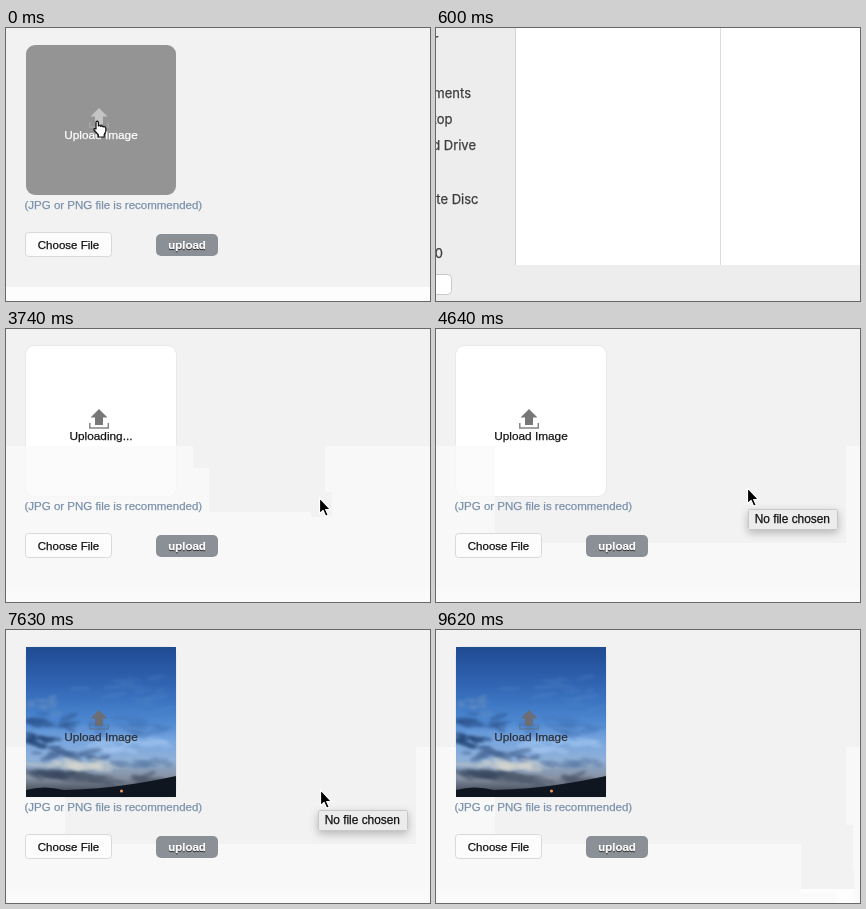
Animation, 424 px wide and 273 px high, one loop 9720 ms. Source, as an HTML page with a canvas:

```html
<!DOCTYPE html>
<html lang="en">
<head>
<meta charset="utf-8">
<title>Image upload</title>
<style>
  html, body { margin: 0; width: 100%; height: 100%; overflow: hidden; background: #f2f2f2; }
  canvas { display: block; }
</style>
</head>
<body>
<canvas id="stage" width="424" height="273"></canvas>
<script>
const W = 424, H = 273, LOOP = 9720;
const SANS = '"Liberation Sans", Arial, sans-serif';
const UI = 'Inter, Roboto, sans-serif';
const stage = document.getElementById('stage').getContext('2d');

// Held poses: [start time, x, y]; a pose without a position hides the pointer.
const pointerPoses = [
  [0], [3140, 189, 0], [3290, 205, 119], [3590, 307, 162], [3740, 313, 168],
  [3890, 312, 161], [4040, 311, 159], [4490, 310, 159], [4640, 311, 158],
  [7630, 314, 159], [7780, 316, 161], [7930, 320, 165], [8080, 328, 170],
  [8200, 342, 180], [8350, 366, 196], [8500, 405, 242], [8650, 405, 262], [8800]
];
// Vertical offset of the file dialog: [start time, offset].
const dialogPoses = [[0], [300, -171], [450, -28], [600, 0], [2400, -171], [2550]];
// Areas where the page is repainted without the haze: [time, x, y, width, height].
const refreshed = [
  [2550, 0, 0, 424, 117], [3290, 187, 0, 30, 139], [3590, 203, 117, 116, 66],
  [3740, 305, 163, 21, 25], [4040, 59, 102, 351, 112],
  [8500, 365, 195, 52, 68], [8650, 400, 239, 18, 34]
];

const poseAt = (poses, t) => poses.findLast(pose => pose[0] <= t).slice(1);

function rect(c, x, y, w, h, fill) {
  c.fillStyle = fill;
  c.fillRect(x, y, w, h);
}

function roundRect(c, x, y, w, h, radius, fill, stroke) {
  c.beginPath();
  c.roundRect(x, y, w, h, radius);
  c.fillStyle = fill;
  c.fill();
  if (stroke) {
    c.strokeStyle = stroke;
    c.lineWidth = 1;
    c.stroke();
  }
}

// The hairline outline gives the slightly heavier strokes of smoothed type.
function text(c, label, x, y, font, fill, align = 'left') {
  c.font = font;
  c.fillStyle = c.strokeStyle = fill;
  c.textAlign = align;
  c.lineWidth = .25;
  c.fillText(label, x, y);
  c.strokeText(label, x, y);
}

function makePhoto() {
  const canvas = document.createElement('canvas');
  canvas.width = canvas.height = 150;
  const c = canvas.getContext('2d');
  const sky = c.createLinearGradient(0, 0, 0, 150);
  ['#1f4b91', '#2857a3', '#3165b3', '#3d76c3', '#4f89d1', '#78a6df', '#8fb0d8', '#8690a0', '#27303e']
    .forEach((color, i) => sky.addColorStop(i / 8, color));
  rect(c, 0, 0, 150, 150, sky);

  let seed = 7;
  const random = () => (seed = seed * 16807 % 2147483647) / 2147483647;
  const spread = size => (random() + random() - 1) * size;
  const puff = (x, y, rx, ry, tilt) => {
    c.beginPath();
    c.ellipse(x, y, rx, ry, tilt, 0, 7);
    c.fill();
  };
  // A bank of small soft puffs scattered around a centre.
  const clouds = (x, y, w, h, color, count = 14) => {
    c.fillStyle = color;
    for (let i = 0; i < count; i++) {
      puff(x + spread(w), y + spread(h), 4 + random() * w / 5, 1 + random() * 2.5, spread(.5));
    }
  };
  c.filter = 'blur(1.5px)';
  clouds(100, 45, 50, 22, '#5f90cf33');
  clouds(15, 58, 20, 10, '#6b93c455');
  clouds(25, 75, 30, 8, '#2b518b77');
  clouds(110, 80, 45, 10, '#3f6fb166');
  clouds(12, 94, 26, 9, '#1f3f7099');
  clouds(100, 98, 60, 6, '#a3c6f088');
  clouds(50, 108, 50, 5, '#46669599');
  clouds(55, 119, 60, 4, '#d3d6d188', 20);
  clouds(120, 116, 35, 4, '#5f7fa888');
  clouds(30, 128, 40, 4, '#3b4a6199', 18);
  clouds(90, 133, 60, 5, '#4f5a6c99', 20);
  c.filter = 'none';

  c.fillStyle = '#10161f';
  c.beginPath();
  c.moveTo(0, 143);
  c.quadraticCurveTo(18, 138, 38, 143);
  c.quadraticCurveTo(75, 142, 100, 138);
  c.quadraticCurveTo(122, 135, 150, 129);
  c.lineTo(150, 150);
  c.lineTo(0, 150);
  c.fill();
  c.fillStyle = '#ff9a58';
  puff(95.5, 144, 1.5, 1.5, 0);
  return canvas;
}
const photo = makePhoto();

function backdrop(c, hovered) {
  rect(c, 0, 0, W, H, '#f2f2f2');
  rect(c, 0, 259, W, H - 259, '#fdfdfd');
  if (hovered) roundRect(c, 20, 17, 150, 150, 9, '#949494');
  else roundRect(c, 19.5, 16.5, 151, 151, 9, '#fff', '#e9e9e9');
}

function uploadIcon(c, arrow, tray) {
  c.fillStyle = arrow;
  c.fill(new Path2D('M93 80l8.5 8.5h-4.5v7.5h-8v-7.5h-4.5z'));
  c.strokeStyle = tray;
  c.lineWidth = 1.5;
  c.stroke(new Path2D('M83.8 94v5h18.5v-5'));
}

function page(c, t) {
  const hovered = t < 300;
  const loaded = t >= 5540;
  const haze = () => rect(c, 0, 0, W, H, 'rgba(250,250,250,.77)');

  backdrop(c, hovered);
  if (!hovered) {
    haze();
    c.save();
    c.beginPath();
    refreshed.filter(area => area[0] <= t).forEach(area => c.rect(...area.slice(1)));
    c.clip();
    backdrop(c, false);
    c.restore();
  }
  if (loaded) {
    const shown = t < 5990 ? 105 : 150;
    c.drawImage(photo, 0, 0, 150, shown, 20, 17, 150, shown);
  }

  if (hovered) uploadIcon(c, '#c4c4c4', '#a6a6a6');
  else if (loaded) uploadIcon(c, 'rgba(112,106,108,.9)', 'rgba(95,108,130,.6)');
  else uploadIcon(c, '#777', '#858585');

  const uploading = t >= 2840 && t < 4040;
  const captionColor = hovered ? '#fff' : loaded ? '#2b2f36' : '#151515';
  text(c, uploading ? 'Uploading...' : 'Upload Image', 95, 111, '11.8px ' + SANS,
    captionColor, 'center');
  text(c, '(JPG or PNG file is recommended)', 18.5, 181, '11.5px ' + SANS, '#7a90aa');

  roundRect(c, 19.5, 204.5, 86, 24, 3, '#fcfcfc', '#d9d9d9');
  text(c, 'Choose File', 62.5, 221, '11.5px ' + SANS, '#111', 'center');
  roundRect(c, 150, 206, 62, 22, 5, '#8b9097');
  const bold = 'bold 11.5px ' + SANS;
  text(c, 'upload', 181, 222, bold, '#222', 'center');
  text(c, 'upload', 181, 221, bold, '#fff', 'center');
}

function dialog(c, offset) {
  c.save();
  c.translate(0, offset);
  const shadow = c.createLinearGradient(0, 274, 0, 289);
  shadow.addColorStop(0, 'rgba(0,0,0,.28)');
  shadow.addColorStop(.4, 'rgba(0,0,0,.1)');
  shadow.addColorStop(1, 'rgba(0,0,0,0)');
  rect(c, 0, 274, W, 15, shadow);
  rect(c, 0, 0, W, 274, '#ededed');
  rect(c, 80, 0, W - 80, 237, '#fff');
  rect(c, 79, 0, 1, 237, '#d2d2d2');
  rect(c, 284, 0, 1, 237, '#dcdcdc');
  [['r', 2.5, 16], ['Documents', 35, 70], ['Desktop', 16.5, 96], ['Hard Drive', 40, 122],
    ['Remote Disc', 42.5, 176], ['0', 7, 230]]
    .forEach(([label, x, y]) => text(c, label, x, y, '13px ' + UI, '#3c3c3c', 'right'));
  roundRect(c, -30.5, 246.5, 46, 20, 4, '#fff', '#c9c9c9');
  c.restore();
}

function tooltip(c, opacity) {
  c.save();
  c.globalAlpha = opacity;
  c.shadowColor = 'rgba(0,0,0,.25)';
  c.shadowBlur = 9;
  c.shadowOffsetY = 3;
  roundRect(c, 312, 180, 90, 21, 1, '#ececec');
  c.shadowColor = 'transparent';
  roundRect(c, 312.5, 180.5, 89, 20, 1, '#ececec', '#c8c8c8');
  text(c, 'No file chosen', 356.3, 194, '11.9px ' + SANS, '#111', 'center');
  c.restore();
}

function shape(c, path, x, y, fill, stroke) {
  c.save();
  c.translate(x, y);
  c.lineJoin = 'round';
  c.lineWidth = 1.2;
  c.fillStyle = fill;
  c.strokeStyle = stroke;
  c.fill(path);
  c.stroke(path);
  c.restore();
}
const arrowPointer = new Path2D('M.5 .8v16l3.6-3.4 2.5 5.8 2.6-1.1-2.5-5.6h4.8z');
const handPointer = new Path2D('M3 9V2q1.2-1.8 2.4 0v4q1.4-1.2 2.4.4 1.4-1 2.4.4 2.4-.6 2.6 1.4v3.4l-1.6 3V17H5.4v-2L1 10q-.5-2 2-1z');

function draw(t) {
  page(stage, t);
  if (t >= 4040 && t < 9620) tooltip(stage, t < 4190 ? .5 : 1);
  const [offset] = poseAt(dialogPoses, t);
  if (offset !== undefined) dialog(stage, offset);
  const [x, y] = poseAt(pointerPoses, t);
  if (x !== undefined) shape(stage, arrowPointer, x, y, '#000', '#fff');
  if (t < 300) shape(stage, handPointer, 87, 92, '#fff', '#111');
}

const start = performance.now();
function tick() {
  draw((performance.now() - start) % LOOP);
  requestAnimationFrame(tick);
}
tick();
</script>
</body>
</html>
```
